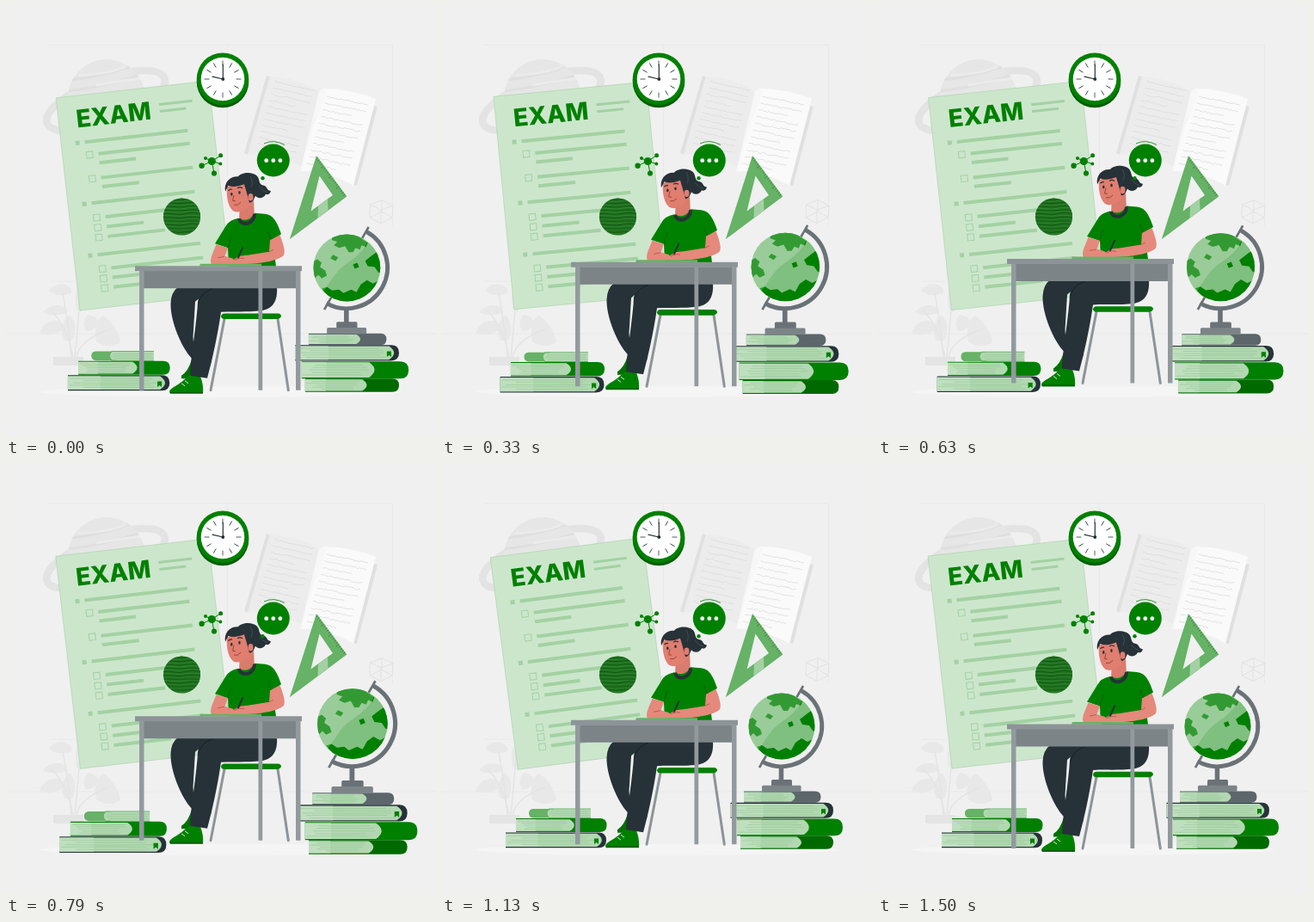
Animation of 500 by 500 pixels, one loop 1.54 s. Source, as an HTML page:

```html
<!DOCTYPE html>
<html lang="en">
<head>
<meta charset="utf-8">
<title>Exam</title>
<style>
html,body{margin:0;width:100%;height:100%;overflow:hidden;background:#f0f0f0}
svg{display:block;width:100vw;height:100vh}
</style>
</head>
<body>
<svg viewBox="0 0 500 500" xmlns="http://www.w3.org/2000/svg">
<defs>
  <clipPath id="ball"><circle cx="395" cy="305" r="38.5"/></clipPath>
  <clipPath id="orb"><circle cx="204.5" cy="245" r="21.6"/></clipPath>
  <clipPath id="ringed"><circle cx="117" cy="107" r="45"/></clipPath>
</defs>

<!-- room -->
<g fill="none" stroke="#e9e9e9">
  <path d="M0 381H500M49 45.500H449.500V255M257.500 45V200M50 320H80"/>
</g>
<ellipse cx="250" cy="448.500" rx="210" ry="6.500" fill="#f5f5f5"/>

<!-- ringed planet -->
<g>
  <ellipse cx="116" cy="110" rx="73" ry="25" transform="rotate(-21 116 110)" fill="none" stroke="#e3e3e3" stroke-width="8.500"/>
  <g clip-path="url(#ringed)">
    <rect x="70" y="60" width="95" height="95" fill="#e6e6e6"/>
    <g fill="none" stroke="#dfdfdf" stroke-width="3">
      <path d="M72 86Q110 84 162 64M70 99Q115 95 165 77"/>
      <path d="M85 80Q118 80 140 70M105 92Q140 86 160 84" stroke="#ebebeb"/>
    </g>
  </g>
</g>

<!-- plant -->
<g fill="#e8e8e8">
  <path d="M55 408H90V418H55Z" fill="#e4e4e4"/>
  <path d="M50 331Q57 321 69 324Q78 328 76 334Q60 340 50 331ZM43 356Q52 345 66 349L72 356Q54 363 43 356ZM39 380Q46 364 61 366Q67 369 66 377Q52 386 39 380Z"/>
  <path d="M68 389Q60 371 74 359Q85 372 77 389ZM82 352Q78 331 88 322Q94 337 88 356ZM93 378Q87 367 95 359Q108 360 106 371Q101 379 93 378ZM105 390Q101 366 113 360Q130 372 133 391Q119 400 105 390Z"/>
  <path d="M76 408Q74 380 66 334M78 408Q70 370 52 354M80 408Q83 380 86 340M82 408Q86 388 120 376" fill="none" stroke="#e4e4e4" stroke-width="1.500"/>
</g>

<!-- notebook -->
<g>
  <path d="M303 81L307 82L281 173L277 171Z" fill="#e0e0e0"/>
  <path d="M307 82Q340 84 364 99L344 187Q316 171 281 172Z" fill="#ececec"/>
  <path d="M428 116L432 117L408 209L403 208Z" fill="#e0e0e0"/>
  <path d="M369 96Q400 96 430 108L404 209Q371 190 342 192Z" fill="#fafafa"/>
  <path d="M364 99L369 96L373 98L361 133L358 131L344 191L342 192Z" fill="#f7f7f7"/>
  <g id="notes" fill="none" stroke="#dedede" stroke-width=".9"/>
</g>

<!-- wire cube -->
<path d="M423.500 231L437 225.500L450 232L449 246L436 252.500L423 246ZM423.500 231L436 237L450 232M436 237V252.500M437 225.500V239L423 246M437 239L449 246" fill="none" stroke="#e2e2e2"/>

<!-- paper sheet -->
<g id="sheet">
  <rect width="178.500" height="248.600" fill="#cce6cc" stroke="#a9d0a9" stroke-width=".6"/>
  <text x="20.500" y="37" font-family="Inter, 'Open Sans', sans-serif" font-weight="800" font-size="28.400" fill="#008000">EXAM</text>
  <g id="rows"/>
</g>

<!-- dark orb -->
<g clip-path="url(#orb)">
  <rect x="182" y="222" width="45" height="46" fill="#1f701f"/>
  <g id="bands" fill="none"/>
</g>

<!-- clock -->
<g>
  <circle cx="252" cy="88" r="30.300" fill="#006000"/>
  <circle cx="252" cy="84.800" r="30.300" fill="#008000"/>
  <circle cx="252" cy="85" r="25.300" fill="#fff"/>
  <g id="ticks" stroke="#263238" stroke-width=".8"/>
  <path d="M252.300 85V68M252.300 85L240 82.200" stroke="#263238" stroke-width="1.200" stroke-linecap="round"/>
  <circle cx="252.300" cy="85" r="1.900" fill="#263238"/>
</g>

<!-- molecule -->
<g fill="#008000">
  <path d="M227.500 185.800L239.300 180.500L242 194.500M249.500 173.800L239.300 180.500L249.300 183.500M232 177L239.300 180.500" fill="none" stroke="#008000"/>
  <circle cx="239.300" cy="180.500" r="4.600"/><circle cx="227.600" cy="185.800" r="3.200"/>
  <circle cx="242" cy="194.500" r="3.100"/><circle cx="249.600" cy="173.800" r="2.500"/>
  <circle cx="249.300" cy="183.500" r="2"/><circle cx="232" cy="177" r="2"/>
</g>

<!-- set square -->
<g>
  <path fill-rule="evenodd" fill="#66b266" d="M361 174L396.300 221.500L329.800 271.300ZM364.500 197.500L354.500 238.500L380 220Z"/>
  <path d="M362.500 246.500L363 232.500L374 224.500L374.500 237.500Z" fill="#a3d1a3"/>
  <g id="marks" stroke="#2f7d2f" stroke-width=".8"/>
</g>

<!-- books and globe -->
<g id="pulse">
  <g id="books"/>
  <g fill="none" stroke="#6a7277">
    <path d="M420 258L412 272M369 353L377 339" stroke-width="2.600"/>
    <path d="M417.500 263.300A47 47 0 1 1 371.500 345.700" stroke-width="4.800"/>
  </g>
  <g fill="#6a7277">
    <rect x="391.700" y="352" width="5.500" height="18"/>
    <rect x="383" y="367" width="24" height="8" rx="1.500"/>
    <rect x="372" y="373.700" width="45.500" height="7.300" rx="1.500" fill="#7c8488"/>
  </g>
  <g clip-path="url(#ball)">
    <rect x="355" y="265" width="80" height="80" fill="#7fbf7f"/>
    <g fill="#008000">
      <path d="M377 268L398 262L419 276L417 281L412 279L410 284L405 282L402 287L397 287L393 280L386 282L380 279L384 275L378 273Z"/>
      <path d="M429 287L437 292L436 312L431 310L427 304L419 303L416 297L421 293Z"/>
      <path d="M354 299L361 295L366 299L364 304L370 308L372 314L366 317L362 313L357 318Z"/>
      <path d="M366 329L372 327L378 331L386 330L391 334L400 330L406 333L411 324L418 319L425 323L431 320L424 338L405 348L382 347Z"/>
      <path d="M379 290L385 293L382 297L376 294ZM402 301L407 299L409 304L404 306Z"/>
    </g>
    <path d="M350 260H421C421 281 409 290 395 300C379 311 377 322 366 334L350 345Z" fill="#fff" opacity=".2"/>
  </g>
</g>

<!-- student at the desk -->
<g id="desk">
  <path d="M254 364L238 447M316 364L328.300 447" stroke="#8d9498" stroke-width="3" stroke-linecap="round"/>
  <path d="M254 357.700H316Q320 358 320 361Q319 364 315 364.300H254Q250 364 250 361Q250.500 358 254 357.700Z" fill="#008000"/>

  <path d="M204 434V430Q212 425 216 411L223 404L235 407Q240 411 238 417L227 421L217 434Z" fill="#007000"/>
  <path d="M204 434H217" stroke="#e6f2e6" stroke-width="1"/>
  <path d="M200 327H240L220 344L217.500 385L219 404L216 410C204 397 191 367 191.500 346Q192 333 200 327Z" fill="#263238"/>
  <path d="M190 448C193 443 201 441 207 435L215 428L226 431Q230 441 229 451H191Z" fill="#008000"/>
  <path d="M190.500 449.800H229" stroke="#005c00" stroke-width="1.400"/>
  <path d="M204 439L208 442M208 436L212 439" stroke="#d9ecd9" stroke-width="1"/>
  <path d="M231 327H315C316 343 311 352 297 354.500C280 356.500 263 355 250 356C246 384 240 411 234 433L214 430C215 408 220 380 222.500 352Q223 333 231 327Z" fill="#263238"/>
  <path d="M240 329Q227 333 223.500 346" fill="none" stroke="#161f24" stroke-width="1"/>

  <!-- torso -->
  <path d="M272 230L288 225L289 247Q281 255 271 249Z" fill="#d97b6d"/>
  <path d="M270 247Q259 249 255 257L243 276.500L258 281.500L259 303H314L310 272L320 265.500C315 251 311 243 301 242L289 241Q282 253 270 247Z" fill="#008000"/>
  <path d="M271 247.500Q273 254.500 281 253Q289 250 289 242" fill="none" stroke="#263238" stroke-width="4"/>
  <path d="M258 281.500L262 268M309 273L304 262" fill="none" stroke="#006300" stroke-width="1"/>

  <!-- arms -->
  <path d="M244.500 277.500L258 281.500L254.500 291L264 294L268 300.500H239Q237 298 239 291Z" fill="#e4897b"/>
  <path d="M307 272.500L318.500 266.500C323 278 325 286 323 290C318 296 295 301 267 300.500L262 297L271 291L281 290L306 286Z" fill="#e4897b"/>
  <path d="M275.500 280.500L269.500 294" stroke="#263238" stroke-width="2"/>
  <path d="M266 296Q270 292 277 294M246 293L254 291.500M306 286L311 283.500" fill="none" stroke="#b95f53" stroke-width="1"/>

  <!-- head -->
  <path d="M257 211C256 222 258 233 264 238.500C271 242.500 282 237 288 227L289 210L272 202Z" fill="#e07e70"/>
  <path d="M255 216C253 206 260 198 270 198.500C273 194 286 192 292 198C296 203 293 208 300 209C305 211 302 214 308 215.500C307 219 304 220 302 219C300 224 293 225 290 221C288 226 286 229 283 229Q280 217 277 207.500Q266 212 258.500 209Q257 212 255 216Z" fill="#263238"/>
  <ellipse cx="284.500" cy="222.500" rx="3" ry="4.200" fill="#e07e70"/>
  <path d="M284 198Q288 205 285 211M294 210Q299 216 304 217" fill="none" stroke="#47535a" stroke-width=".8"/>
  <g fill="#263238">
    <ellipse cx="262.300" cy="219" rx="1.200" ry="1.900"/><ellipse cx="271.500" cy="217" rx="1.200" ry="1.900"/>
  </g>
  <path d="M258.500 215Q260.500 212.500 263 213.500M269 212Q272 210 275 212" fill="none" stroke="#263238" stroke-width="1.200"/>
  <path d="M265 220L263.500 226.500L267 227M265 231.500Q270 232.500 273 228.500" fill="none" stroke="#9c453c" stroke-width="1"/>

  <!-- table -->
  <path d="M226 300H297V302.700H225Z" fill="#66b266"/>
  <path d="M160 308H337V328.500H160Z" fill="#7c8487"/>
  <path d="M155 308H160.500V447H155ZM337 308H342.500V447H337ZM293.500 308H298.200V447H293.500Z" fill="#929a9e"/>
  <path d="M150 302.500H344V308.500H150Z" fill="#8d9498"/>
</g>

<!-- speech bubble -->
<g fill="#008000">
  <circle cx="310.800" cy="179.500" r="19"/><circle cx="298.500" cy="200.300" r="2.200"/>
  <path d="M300 160Q311 154.500 324 161.500" fill="none" stroke="#008000" stroke-width=".8"/>
  <g fill="#fff"><circle cx="302.700" cy="179.700" r="2.400"/><circle cx="310.800" cy="179.700" r="2.400"/><circle cx="318.900" cy="179.700" r="2.400"/></g>
</g>
</svg>
<script>
const $ = id => document.getElementById(id);
const rect = (x, y, w, h, attrs) => `<rect x="${x}" y="${y}" width="${w}" height="${h}" ${attrs}/>`;
const path = (d, attrs = '') => `<path d="${d}" ${attrs}/>`;

let seed = 7;
const rand = () => (seed = seed * 16807 % 2147483647) / 2147483647;

// Exam sheet: kind, x end, y; sections have a bullet, others sit beside a box or are plain
const layout = [
  ['bullet', 148, 54.8], ['box', 148.5, 70], ['plain', 84.5, 80.5], ['box', 149, 98], ['plain', 85, 108.5],
  ['bullet', 148, 126.2], ['box', 148.5, 143.6], ['box', 85, 155.2], ['box', 109, 166.7],
  ['bullet', 148, 186.5], ['box', 149, 203.5], ['box', 85, 214.7], ['box', 109, 226]
];
$('rows').innerHTML = rect(118, 19.5, 39, 3, 'fill="#a3d1a3"') + rect(118, 27.5, 31, 3, 'fill="#a3d1a3"') +
  layout.map(([kind, end, y]) => {
    const x = kind === 'bullet' ? 27.5 : 41.8;
    let s = rect(x, y - 2, end - x, 4, 'fill="#a3d1a3"');
    if (kind === 'bullet') s += rect(16.5, y - 2.5, 5, 5, 'fill="#a3d1a3"');
    if (kind === 'box') s += rect(27.7, y - 3.7, 7.5, 7.5, 'fill="none" stroke="#a3d1a3"');
    return s;
  }).join('');

// Clock ticks
for (let i = 0; i < 12; i++)
  $('ticks').innerHTML += path('M252 63.500V69.500', `transform="rotate(${i * 30} 252 85)"`);

// Handwriting on the notebook
const scribble = (x, y, w, slope) => {
  let d = `M${x} ${y}`;
  for (let i = 2; i <= w; i += 2) d += `L${x + i} ${(y + i * slope + (rand() - .5) * 1.8).toFixed(1)}`;
  return path(d);
};
let notes = '';
for (let i = 0; i < 11; i++) {
  notes += scribble(312 - i * 2, 88 + i * 7.2, 46 - (i % 4 === 3 ? 16 : 0), .22);
  notes += scribble(373 - i * 2.3, 105 + i * 7.8, 48 - (i % 4 === 2 ? 14 : 0), .21);
}
$('notes').innerHTML = notes;

// Streaks on the orb
let bands = '';
for (let i = 0; i < 22; i++) {
  const y = 223 + i * 2.1, a = rand() * 2.5;
  bands += path(`M181 ${y}C192 ${y - a} 198 ${y + a} 207 ${y}S222 ${y - a} 229 ${y + 1}`,
    `stroke="${i % 2 ? '#155815' : '#2e862e'}" stroke-width="${(.5 + rand() * .8).toFixed(1)}"`);
}
$('bands').innerHTML = bands;

// Ruler marks along the long edge
for (let i = 1; i < 20; i++) {
  const x = 361 + i * 1.76, y = 174 + i * 2.37, n = i % 5 ? 2.5 : 4.5;
  $('marks').innerHTML += path(`M${x} ${y}l${-n * .8} ${n * .6}`);
}

// Books: cover from x to end, page block from x to pageEnd
function book(x, y, end, h, cover, pageEnd, ribbon) {
  const r = h / 2, p = pageEnd - r + 1.5, top = y + 1.2, low = y + h - 1.2;
  let s = path(`M${x} ${y}H${end - r}Q${end} ${y} ${end} ${y + r}Q${end} ${y + h} ${end - r} ${y + h}H${x}Z`, `fill="${cover}"`);
  s += path(`M${x} ${top}H${p}Q${pageEnd + 4} ${y + r} ${p} ${low}H${x}Z`, 'fill="#b2d8b2"');
  s += path(`M${x} ${top}H${x + (pageEnd - x) * .33}V${low}H${x}Z`, 'fill="#bfdfbf"');
  for (let i = 1; i < 6; i++) {
    const ly = top + (low - top) * i / 6, from = x + rand() * 20;
    s += path(`M${from} ${ly}Q${(from + p) / 2} ${ly + rand() * 2 - 1} ${p - rand() * 12} ${ly}`, 'fill="none" stroke="#8cc28c" stroke-width=".5"');
  }
  if (ribbon) s += path(`M${end - 14} ${y + h * .4}h5v6.500l-2.500-2l-2.500 2Z`, 'fill="#008000"');
  return s;
}
$('books').innerHTML =
  path('M106 401H130V411.500H106Q101 411 101 406.200Q101 401.500 106 401Z', 'fill="#66b266"') +
  path('M125 401.500H173V411H125Q120 406 125 401.500Z', 'fill="#b2d8b2"') +
  path('M127 404H172M125 406.500H170M128 409H172', 'stroke="#8cc28c" stroke-width=".5"') +
  path('M124 401H173M124 411.500H173', 'stroke="#66b266" stroke-width="1"') +
  book(86, 412, 191.5, 16, '#008000', 155) +
  book(74, 428.5, 191, 17.8, '#263238', 187.5, true) +
  book(351, 380.5, 440.5, 13.2, '#5c666b', 411) +
  book(335.5, 393.8, 455, 18, '#263238', 451, true) +
  book(343, 412.5, 466, 19.8, '#008000', 429) +
  book(347, 432.3, 455, 15.5, '#006a00', 419);

// Piecewise linear easing through [position, value] stops
const along = (stops, p) => {
  const i = Math.max(1, stops.findIndex(s => s[0] >= p));
  const [a, b] = [stops[i - 1], stops[i]];
  return a[1] + (b[1] - a[1]) * (p - a[0]) / (b[0] - a[0]);
};
const LOOP = 1540, CYCLE = 1500, STEP = 1000 / 24;
const sway = [[0, 0], [.25, 1], [.75, -1], [1, 0]];
const lift = [[0, 0], [.5, -10], [1, 0]];
const beat = [[0, 1], [.1, 1.1], [.3, 1], [.4, 1], [.5, 1.1], [.6, 1], [1, 1]];

function draw(ms) {
  // 24 pictures a second
  const t = Math.floor((ms % LOOP + 5) / STEP) * STEP;
  const p = Math.min(t + 16, CYCLE) / CYCLE;
  $('sheet').setAttribute('transform', `translate(162 220.300) rotate(${along(sway, p) - 6.47}) translate(-90.500 -124.300)`);
  $('desk').setAttribute('transform', `translate(0 ${along(lift, p)})`);
  $('pulse').setAttribute('transform', `translate(266 352) scale(${along(beat, p)}) translate(-266 -352)`);
}

let start;
function tick(now) {
  if (start === undefined) start = now;
  draw(now - start);
  requestAnimationFrame(tick);
}
draw(0);
requestAnimationFrame(tick);
</script>
</body>
</html>
```
